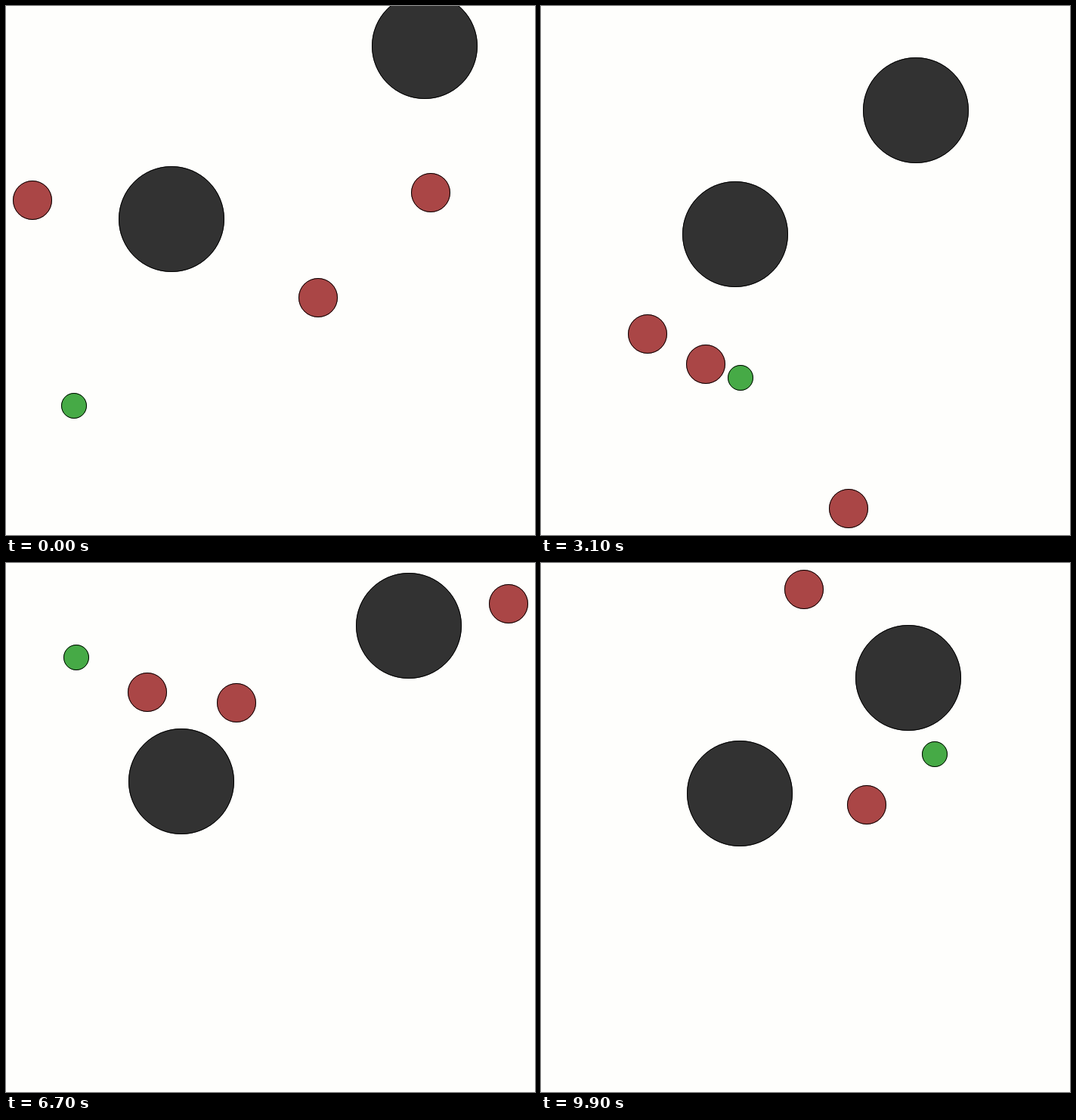
Write an HTML page with a canvas that moves like this. It is 700x700 px and loops after 10000 ms.

```html
<!DOCTYPE html>
<html lang="en">
<head>
<meta charset="utf-8">
<title>Chase</title>
<style>
html, body { margin: 0; width: 100%; height: 100%; overflow: hidden; background: #fefefc; }
canvas { display: block; width: 700px; height: 700px; }
</style>
</head>
<body>
<canvas id="stage" width="700" height="700"></canvas>
<script>
const ctx = document.getElementById('stage').getContext('2d');
const STEP = 100, STEPS = 100, MID = 350, REACH = 315;
const RED = '#aa4646', GREEN = '#46aa46', DARK = '#323232';

// Every mover passes its turning points, in world space, at these steps
const TURNS = [0, 21, 40, 56, 67, 80, 99];

const chaser = (...path) => ({ path, r: 26, color: RED });
const runner = (...path) => ({ path, r: 17, color: GREEN });
const rock = (x, y) => ({ path: [[x, y]], r: 70, color: DARK });

const items = [
  chaser([-334, -99], [-461, 190], [-131, 7], [93, -204], [-192, -211], [-322, 134], [129, -48]),
  chaser([67, 38], [81, 475], [109, 346], [263, -172], [372, -350], [153, -554], [-3, -501]),
  chaser([225, -109], [-267, 229], [-52, 69], [157, -216], [-53, -195], [-331, -120], [-150, -82]),
  runner([-276, 190], [-430, 184], [149, 184], [47, -196], [-303, -266], [-257, 222], [272, -154]),
  rock(216.6, -315),
  rock(-139, -72)
];

function slope(path, i, axis) {
  const a = Math.max(i - 1, 0), b = Math.min(i + 1, path.length - 1);
  return (path[b][axis] - path[a][axis]) / (TURNS[b] - TURNS[a]);
}

// Smooth curve through the turning points
function locate(path, n) {
  if (path.length === 1) return path[0];
  let i = 0;
  while (i < path.length - 2 && TURNS[i + 1] <= n) i++;
  const span = TURNS[i + 1] - TURNS[i];
  const u = (n - TURNS[i]) / span, v = 1 - u;
  return [0, 1].map(k =>
    path[i][k] * v * v * (1 + 2 * u) + path[i + 1][k] * u * u * (3 - 2 * u) +
    span * u * v * (slope(path, i, k) * v - slope(path, i + 1, k) * u));
}

function disc(x, y, r, color) {
  ctx.beginPath();
  ctx.arc(x, y, r, 0, Math.PI * 2);
  ctx.fillStyle = color;
  ctx.fill();
  ctx.beginPath();
  ctx.arc(x, y, r - 0.5, 0, Math.PI * 2);
  ctx.stroke();
}

function draw(n) {
  const spots = items.map(it => locate(it.path, n));
  // The camera zooms so that the farthest item stays at the margin
  const zoom = REACH / Math.max(...spots.flat().map(Math.abs));
  ctx.fillStyle = '#fefefc';
  ctx.fillRect(0, 0, 700, 700);
  ctx.strokeStyle = '#000';
  ctx.lineWidth = 1;
  items.forEach((it, i) => {
    const [x, y] = spots[i].map(c => Math.round(MID + c * zoom));
    disc(x, y, it.r, it.color);
  });
}

function tick() {
  draw(Math.floor(performance.now() / STEP) % STEPS);
  requestAnimationFrame(tick);
}
tick();
</script>
</body>
</html>
```
